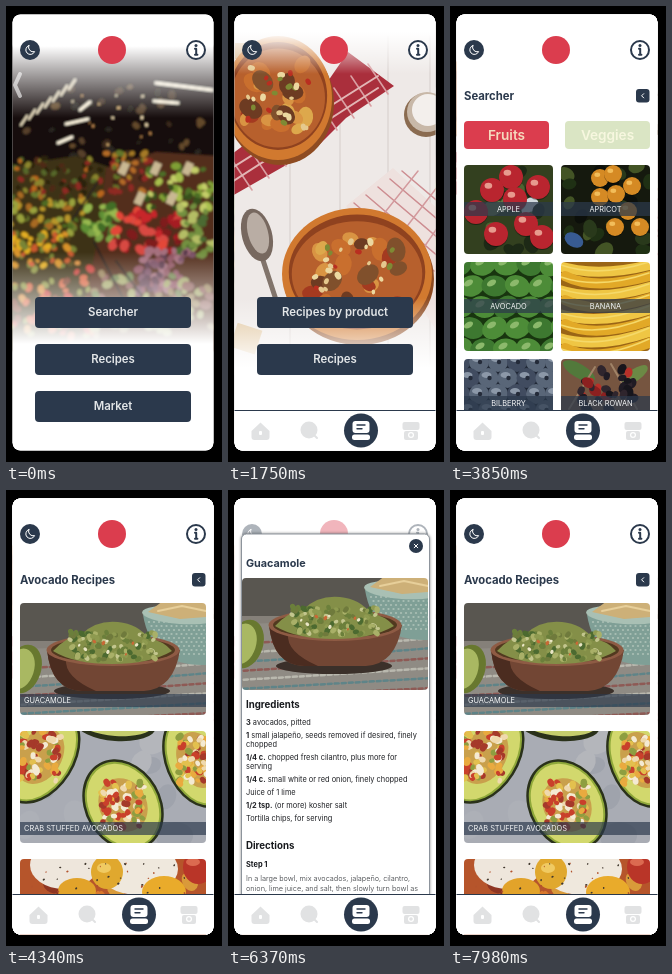
Recreate the animation shown at these times as an HTML page. Size 216 px wide and 456 px high, loop 8000 ms.

```html
<!DOCTYPE html>
<html lang="en">
<head>
<meta charset="utf-8">
<title>Recipe app</title>
<style>
  html, body { margin: 0; width: 100%; height: 100%; overflow: hidden; background: #000; }
  svg { display: block; width: 100vw; height: 100vh; }
  text { font-family: Inter, "Open Sans", sans-serif; }
</style>
</head>
<body>
<svg id="stage" viewBox="0 0 216 456" xmlns="http://www.w3.org/2000/svg"></svg>
<script>
const NAVY = '#2b394c', RED = '#db3d4e', GREY = '#e1e2e3', WHITE = '#fff';

// Drawing helpers
const rect = (x, y, w, h, fill, r = 0, more = '') =>
  `<rect x="${x}" y="${y}" width="${w}" height="${h}" rx="${r}" fill="${fill}" ${more}/>`;
const oval = (x, y, rx, ry, fill, turn = 0, more = '') =>
  `<ellipse cx="${x}" cy="${y}" rx="${rx}" ry="${ry}" fill="${fill}" transform="rotate(${turn} ${x} ${y})" ${more}/>`;
const dot = (x, y, r, fill, more = '') => oval(x, y, r, r, fill, 0, more);
const shape = (d, fill, more = '') => `<path d="${d}" fill="${fill}" ${more}/>`;
const line = (d, color, width = 1, more = '') =>
  shape(d, 'none', `stroke="${color}" stroke-width="${width}" stroke-linecap="round" stroke-linejoin="round" ${more}`);
const text = (x, y, s, size, weight = 400, fill = NAVY, anchor = 'start') =>
  `<text x="${x}" y="${y}" font-size="${size}" font-weight="${weight}" fill="${fill}" text-anchor="${anchor}">${s}</text>`;
const group = (body, more = '') => `<g ${more}>${body}</g>`;
const each = (n, fn) => Array.from({ length: n }, (_, i) => fn(i)).join('');

function random(seed) {
  return () => (seed = (seed * 16807) % 2147483647) / 2147483647;
}

// Small ovals strewn over a box
function scatter(n, seed, x, y, w, h, r, colors) {
  const rnd = random(seed * 7919);
  rnd();
  return each(n, () => {
    const px = x + rnd() * w, py = y + rnd() * h, k = r * (0.7 + rnd() * 0.6);
    return oval(px.toFixed(1), py.toFixed(1), k.toFixed(1), (k * 0.75).toFixed(1),
      colors[Math.floor(rnd() * colors.length)], Math.round(rnd() * 180));
  });
}

const fade = (id, from, to) =>
  `<linearGradient id="${id}" gradientUnits="userSpaceOnUse" x1="0" x2="0" y1="${from}" y2="${to}">
   <stop offset="0" stop-color="#fff"/><stop offset="1" stop-color="#fff" stop-opacity="0"/></linearGradient>`;

const defs = `<defs>
  <clipPath id="device"><rect x="6.5" y="8.5" width="201" height="436" rx="8"/></clipPath>
  <clipPath id="square"><rect width="89" height="89" rx="4"/></clipPath>
  <clipPath id="wide"><rect width="186" height="112" rx="4"/></clipPath>
  <filter id="soft"><feGaussianBlur stdDeviation="0.5"/></filter>
  <filter id="haze"><feGaussianBlur stdDeviation="0.8"/></filter>
  ${fade('homeTop', 40, 112)}${fade('homeEnd', 338, 246)}
  ${fade('foodTop', 26, 68)}${fade('foodEnd', 362, 292)}
</defs>`;

const photo = (x, y, clip, body) =>
  group(group(group(body, 'filter="url(#soft)"'), `clip-path="url(#${clip})"`), `transform="translate(${x} ${y})"`);
const sheet = rect(6, 8, 204, 438, WHITE);
const veil = (top, end) => rect(6, 8, 204, 200, `url(#${top})`) + rect(6, 208, 204, 238, `url(#${end})`);
const button = (y, label) =>
  rect(29, y, 156, 31, NAVY, 4) + text(107, y + 19, label, 11.4, 600, '#e3e6e8', 'middle');

// Home
const market = group(
  rect(4, 40, 210, 300, '#16110d') +
  scatter(36, 3, 8, 78, 195, 74, 4, ['#3c2b1c', '#56402a', '#211a14', '#64482b', '#2b2724']) +
  each(7, i => line(`M${15 + i * 8} ${119 - i * 6}l6 -9`, '#f4e6c6', 2.2)) +
  line('M60 118L82 113M52 137L66 131M74 104L84 96M150 77L206 84M148 95L172 97', '#fff6e0', 3) +
  scatter(14, 6, 60, 85, 85, 55, 1.5, ['#ffe9bd', '#e3b878', '#c98f52']) +
  shape('M4 160L70 150L135 172L100 250L70 345H4Z', '#3e3313') +
  shape('M100 162L150 146L212 150V345H70L92 230Z', '#522d1c') +
  scatter(70, 5, 5, 152, 90, 40, 3.2, ['#8e2c22', '#b9661f', '#56682a', '#8b852f', '#4f2a18', '#292411']) +
  scatter(60, 11, 5, 188, 76, 42, 3.6, ['#4f6a24', '#b8952a', '#6b7a2d', '#9aa23d', '#a86a24', '#3b3715']) +
  scatter(60, 8, 5, 228, 62, 32, 3.6, ['#e3ad20', '#d8932a', '#798535', '#c95a2d', '#54491c']) +
  scatter(70, 9, 5, 256, 84, 75, 3.8, ['#c93f38', '#d9603b', '#8e9440', '#d98f3f', '#7c3d2c']) +
  scatter(46, 12, 100, 146, 46, 40, 3.4, ['#a67a25', '#8f2a24', '#b36b28', '#637529', '#3a2416']) +
  scatter(54, 13, 140, 160, 68, 42, 4, ['#7f9f35', '#a8bf4d', '#4e6e28', '#c3cd68', '#39501e']) +
  scatter(34, 18, 76, 200, 36, 34, 4.5, ['#5f8f34', '#98b950', '#426e27', '#7ba244']) +
  scatter(46, 15, 106, 205, 68, 40, 5, ['#c7262c', '#e34738', '#a51e24', '#d84a42', '#7f1a1c']) +
  scatter(34, 17, 174, 198, 34, 55, 4.5, ['#739040', '#b4bd65', '#4c6b31']) +
  scatter(60, 21, 132, 242, 54, 44, 4.2, ['#795064', '#a5707e', '#8e5360', '#5c3a4c']) +
  scatter(50, 23, 82, 264, 125, 65, 5, ['#967f54', '#8c5b55', '#a3a666', '#70824b']) +
  line('M92 176L66 214M88 236L122 302M110 255L136 290', '#2c2620', 2) +
  each(5, i => rect(114 + i * 16, 156 + (i % 2) * 30, 8, 13, '#c9b893', 0,
    `transform="rotate(24 ${118 + i * 16} ${162 + (i % 2) * 30})"`)), 'filter="url(#haze)"');
const home = sheet + market + veil('homeTop', 'homeEnd') + line('M14 68L9 79L14 90', WHITE, 4, 'opacity=".6"') +
  button(291, 'Searcher') + button(338, 'Recipes') + button(385, 'Market');

// Recipe menu
const stew = (x, y, rx, ry, seed) =>
  oval(x + 2, y + 5, rx, ry, '#8e4b21') + oval(x, y, rx, ry, '#d1792f') +
  oval(x, y - 2, rx * 0.91, ry * 0.87, '#8f421f') + oval(x, y, rx * 0.87, ry * 0.8, '#b7602d') +
  scatter(16, seed, x - rx * 0.62, y - ry * 0.55, rx * 1.2, ry * 1.05, 9, ['#d99443', '#a43a20', '#c96f2e', '#dda84c']) +
  scatter(7, seed + 1, x - rx * 0.6, y - ry * 0.55, rx * 1.2, ry * 1.05, 10, ['#6d3b22', '#80502c']) +
  scatter(24, seed + 4, x - rx * 0.6, y - ry * 0.55, rx * 1.2, ry * 1.05, 3.2, ['#ecd8a0', '#7e8a34', '#e5c98e', '#b92e20']);
const table = group(
  rect(4, 24, 210, 345, '#eee9e7') +
  line('M112 30V370M160 30V370M62 150V370M202 30V370', '#d5cdca', 1) +
  shape('M4 148L98 78L120 46L166 80L118 112L88 142L4 190Z', '#aa2f3c') +
  each(9, i => line(`M${4 + i * 17} ${154 - i * 12}l20 30`, '#d99fa2', 1.6)) +
  line('M4 162L150 70M4 176L150 82', '#e2b6b5', 2) +
  shape('M118 200L165 162L212 205V330L160 250Z', '#eee1de') +
  each(5, i => line(`M${126 + i * 12} ${197 - i * 8}l80 68`, '#cd8d91', 1.5)) +
  line('M150 215L190 165M170 232L210 180M190 250L212 218', '#d39a9d', 1.5) +
  rect(7, 37, 20, 16, '#d5b184') + rect(6, 320, 26, 25, '#dfc39a', 0, 'transform="rotate(18 18 330)"') +
  stew(50, 92, 54, 62, 31) +
  dot(198, 109, 22, '#8a6b50') + dot(199, 106, 20, '#c8b8a8') + dot(200, 104, 16, '#f3efec') +
  line('M33 248L52 306', '#81746b', 5) +
  oval(29, 229, 15, 27, '#77685f', -15) + oval(30, 227, 10, 21, '#b9ada4', -15) +
  stew(129, 268, 75, 66, 47), 'filter="url(#soft)"');
const menu = sheet + table + veil('foodTop', 'foodEnd') + button(291, 'Recipes by product') + button(338, 'Recipes');

// Shared title row
const titleRow = title => text(14, 94, title, 11.3, 700) +
  rect(186, 83, 13.5, 13.5, NAVY, 3) + line('M193.7 87.7L191.6 89.8L193.7 91.9', WHITE);

// Fruit grid
const round = (points, r, color, shine) => points.map(([x, y]) =>
  dot(x, y + 1, r, '#0006') + dot(x, y, r, color) + oval(x - r * 0.3, y - r * 0.35, r * 0.32, r * 0.25, shine)).join('');
const lattice = (cols, rows, dx, dy, fn) => each(cols * rows, i => {
  const row = Math.floor(i / cols);
  return fn((i % cols) * dx + (row % 2) * dx / 2 - 4, row * dy + 3, i);
});
const fruits = [
  ['APPLE', rect(0, 0, 89, 89, '#33401f') + scatter(16, 61, 0, 0, 89, 89, 9, ['#1d2916', '#657846', '#d0d9dd', '#4e6431']) +
    round([[47, 12], [28, 25], [74, 22], [51, 34], [12, 47], [32, 69], [62, 59], [78, 72]], 12, '#b9252f', '#e79a8e')],
  ['APRICOT', rect(0, 0, 89, 89, '#15190e') + scatter(20, 67, 0, 0, 89, 89, 9, ['#29391b', '#435425', '#0c0f0a', '#1f3014']) +
    oval(13, 75, 10, 7, '#385b92', 30) +
    round([[39, 13], [52, 9], [71, 21], [39, 32], [55, 29], [67, 46], [54, 62], [79, 62]], 9, '#d58a24', '#f2bd5a')],
  ['AVOCADO', rect(0, 0, 89, 89, '#18350f') + lattice(5, 5, 23, 21, (x, y, i) =>
    oval(x, y, 13, 10.5, i % 3 ? '#4d8c38' : '#3d7830', -35 + (i % 4) * 20) + oval(x - 3, y - 3, 5, 3, '#8cb96c', -30))],
  ['BANANA', rect(0, 0, 89, 89, '#9a6516') + each(8, i =>
    line(`M${-8 + (i % 2) * 12} ${2 + i * 12}Q35 ${18 + i * 12} 96 ${1 + i * 11}`, i % 2 ? '#e2a927' : '#efc644', 10) +
    line(`M0 ${3 + i * 12}Q38 ${16 + i * 12} 88 ${i * 11}`, '#f5d969', 1.6))],
  ['BILBERRY', rect(0, 0, 89, 89, '#202836') + lattice(6, 6, 19, 16, (x, y, i) =>
    dot(x, y, 10, i % 3 ? '#596678' : '#414c60') + oval(x - 2, y - 3, 5, 3, '#8c98a8') + dot(x + 1, y, 2.2, '#242b39'))],
  ['BLACK ROWAN', rect(0, 0, 89, 89, '#765540') + oval(18, 12, 18, 7, '#52793b', 30) + oval(74, 16, 15, 6, '#6c8945', -35) +
    line('M8 50L34 8M76 50L50 5', '#a08367', 2) + scatter(30, 71, 20, 10, 52, 42, 5, ['#17151c', '#2f252d', '#8c2020', '#b73029', '#201b24'])],
];
const fruitCard = ([name, art], i) => {
  const x = 14 + (i % 2) * 97, y = 159 + Math.floor(i / 2) * 97;
  return photo(x, y, 'square', art) + rect(x, y + 37, 89, 14, NAVY, 0, 'opacity=".72"') +
    text(x + 44.5, y + 47, name, 7.4, 400, '#f4f5f6', 'middle');
};
const tab = (x, label, back, front) =>
  rect(x, 115, 85, 28, back, 4) + text(x + 42.5, 134, label, 13.6, 600, front, 'middle');
const searcher = sheet + titleRow('Searcher') + tab(14, 'Fruits', RED, '#f5d9bd') +
  tab(115, 'Veggies', '#dae5c4', '#f7f7df') + fruits.map(fruitCard).join('');

// Recipe list
const dip = rect(0, 0, 186, 112, '#858079') + rect(0, 0, 186, 38, '#595650') +
  shape('M0 46L186 40V112H0Z', '#8f8b84') +
  each(7, i => line(`M-5 ${66 + i * 9}Q70 ${62 + i * 9} 190 ${50 + i * 10}`,
    ['#8e5a55', '#b9b8ae', '#5f8488'][i % 3], 2.5, 'stroke-dasharray="4 3"')) +
  shape('M123 12L186 17V62Q132 64 123 12Z', '#7f9f96') +
  lattice(14, 11, 5, 4, (x, y) => oval(x + 128, y + 16, 1.2, 0.8, x + 128 > 126 + y * 0.5 && y < 38 ? '#b7cabf' : 'none')) +
  oval(160, 12, 38, 9, '#a9c0b4', 4) + shape('M128 9L143 -2H186V14L160 16Z', '#cdb078') + line('M138 8L162 3L186 8', '#e7cf9a', 2) +
  oval(4, 66, 17, 25, '#68782f', 18) + oval(0, 66, 14, 21, '#a9b862', 18) +
  oval(92, 88, 58, 8, '#3b302a') +
  shape('M27 47Q31 87 62 88H124Q154 86 160 47Z', '#724634') + shape('M27 47Q31 87 62 88H76Q44 74 46 56Z', '#4b2c20') +
  oval(93, 47, 66.5, 16, '#8e5b44') + oval(93, 47, 62, 13, '#51391f') +
  shape('M33 48Q46 34 62 31Q76 17 98 19Q118 21 128 35Q144 38 152 48Q130 61 92 61Q54 61 33 48Z', '#848f48') +
  scatter(100, 89, 50, 28, 86, 29, 3, ['#a9b068', '#6b7f3b', '#c3c68e', '#8e9a50', '#4c6a30', '#6f7a3c']) +
  scatter(9, 93, 58, 30, 68, 22, 1.8, ['#c86936', '#e9e5c4']);
const half = (x, y, rx, ry, turn, seed) =>
  oval(x, y, rx, ry, '#2a311a', turn) + oval(x, y, rx - 2.5, ry - 2.5, '#8fa83a', turn) +
  oval(x, y, rx - 4.5, ry - 4.5, '#d2d86d', turn) +
  oval(x, y, rx * 0.62, ry * 0.58, '#c9a04c', turn) +
  scatter(75, seed, x - rx * 0.58, y - ry * 0.48, rx * 1.16, ry * 0.96, 3.6,
    ['#efd9ae', '#c9402b', '#e9aa3f', '#f4ead2', '#8e9e40', '#e3c04e', '#a5392a']);
const crab = rect(0, 0, 186, 112, '#a9acb4') + scatter(14, 97, 0, 0, 186, 112, 15, ['#b4b6bb', '#9fa3ac', '#adb0b7']) +
  oval(96, -6, 40, 16, '#2a311a', 4) + oval(96, -7, 36, 12, '#c5cd6d', 4) +
  half(20, 25, 35, 52, 32, 101) + half(178, 29, 33, 50, -22, 103) + half(103, 74, 38, 48, -30, 107);
const eggs = rect(0, 0, 186, 112, '#b6552b') + scatter(24, 109, 0, 0, 186, 45, 8, ['#c7662e', '#d9792d', '#8e3522', '#d99a3a']) +
  oval(44, 6, 34, 24, '#eee6dc') + oval(118, 10, 40, 26, '#efe8dd') +
  oval(57, 32, 19, 13, '#e2a32a') + oval(87, 13, 16, 17, '#e0a82e') + oval(84, 9, 7, 5, '#f0ca62') +
  oval(144, 33, 22, 16, '#e9ab2b') + oval(178, 8, 15, 17, '#b93528') + oval(173, 3, 7, 4, '#db6a50') +
  scatter(34, 113, 10, 3, 155, 35, 1, ['#40372d', '#b2532e']);
const dish = (y, art, name) => photo(14, y, 'wide', art) +
  (name ? rect(14, y + 91, 186, 13, NAVY, 0, 'opacity=".68"') + text(18, y + 100, name, 7.4, 400, '#f4f5f6') : '');
const recipes = sheet + titleRow('Avocado Recipes') +
  dish(113, dip, 'GUACAMOLE') + dish(241, crab, 'CRAB STUFFED AVOCADOS') + dish(369, eggs);

// Recipe sheet
const strong = s => `<tspan font-weight="700">${s}</tspan>`;
const ingredients = [
  [235, strong('3') + ' avocados, pitted'],
  [248, strong('1') + ' small jalapeño, seeds removed if desired, finely'],
  [257, 'chopped'],
  [270, strong('1/4 c.') + ' chopped fresh cilantro, plus more for'],
  [279, 'serving'],
  [292, strong('1/4 c.') + ' small white or red onion, finely chopped'],
  [305, 'Juice of 1 lime'],
  [318, strong('1/2 tsp.') + ' (or more) kosher salt'],
  [331, 'Tortilla chips, for serving'],
];
const detail = rect(6, 8, 204, 438, WHITE, 0, 'opacity=".62"') +
  rect(13.5, 44, 188, 420, WHITE, 5, 'stroke="#8d949c" stroke-width="1" style="filter:drop-shadow(0 0 1.5px #0007)"') +
  dot(188, 56, 7, NAVY) + line('M186.2 54.2l3.6 3.6m0 -3.6l-3.6 3.6', WHITE) +
  text(18, 77, 'Guacamole', 10.8, 700) + dish(88, dip) +
  text(18, 218, 'Ingredients', 9.7, 700, '#17191d') +
  ingredients.map(([y, s]) => text(18, y, s, 7.4, 400, '#202226')).join('') +
  text(18, 359, 'Directions', 9.7, 700, '#17191d') + text(18, 377, 'Step 1', 7.4, 700, '#17191d') +
  text(18, 391, 'In a large bowl, mix avocados, jalapeño, cilantro,', 7.3, 300, '#34373b') +
  text(18, 401, 'onion, lime juice, and salt, then slowly turn bowl as', 7.3, 300, '#34373b');

const header = dot(106, 44, 14, RED) +
  dot(24, 44, 10, NAVY) + line('M22.8 39.5A4.6 4.6 0 1 0 28.6 45.6A4.7 4.7 0 0 1 22.8 39.5Z', WHITE, 1) +
  dot(190, 44, 9, WHITE, `stroke="${NAVY}" stroke-width="2"`) + dot(190, 39.4, 1.5, NAVY) +
  line('M189 42.8H190.2V48.8M189 48.8H191.4', NAVY, 2);

const nav = rect(6, 404, 204, 42, WHITE) + rect(6, 404, 204, 1, NAVY) +
  shape('M23.5 425L32.5 416.5L41.5 425V431Q41.5 434 38.5 434H26.5Q23.5 434 23.5 431Z', GREY) + rect(31, 425, 3, 4, WHITE, 1) +
  dot(81, 424, 8.5, GREY) + line('M87 430l2 2', GREY, 2) +
  rect(174.5, 416, 17, 8, GREY, 2) + rect(176, 425, 14, 9, GREY, 2) + dot(183, 429, 3, WHITE) + dot(183, 429, 1.8, GREY) +
  dot(133, 424.5, 17, NAVY) +
  rect(124.5, 415, 17, 12, WHITE, 3) + rect(124, 428.5, 18, 5.5, WHITE, 2.5) +
  line('M129 419H137M129 422.7H134', NAVY, 1.4);

const layers = { home, menu, searcher, recipes, header, detail, nav };
const stage = document.getElementById('stage');
stage.innerHTML = defs + rect(0, 0, 216, 456, '#000') + group(
  Object.entries(layers).map(([id, body]) => group(body, `id="${id}"`)).join(''), 'clip-path="url(#device)"');

const LOOP = 8000, STEP = 70;
const ease = p => p < 0.5 ? 4 * p ** 3 : 1 - 4 * (1 - p) ** 3;
const ramp = (t, from, to) => ease(Math.min(1, Math.max(0, (t - from) / (to - from))));

function show(id, alpha) {
  const node = document.getElementById(id);
  node.style.opacity = alpha;
  node.style.display = alpha > 0 ? '' : 'none';
}

function render(time) {
  const t = Math.floor((time % LOOP) / STEP) * STEP;
  const toMenu = ramp(t, 0, 350);
  show('menu', toMenu);
  show('nav', toMenu);
  show('searcher', ramp(t, 1750, 2170));
  show('recipes', ramp(t, 3850, 4340));
  show('detail', ramp(t, 5950, 6370) - ramp(t, 7630, 7980));
}

const start = performance.now();
function tick() {
  render(performance.now() - start);
  requestAnimationFrame(tick);
}
tick();
</script>
</body>
</html>
```
